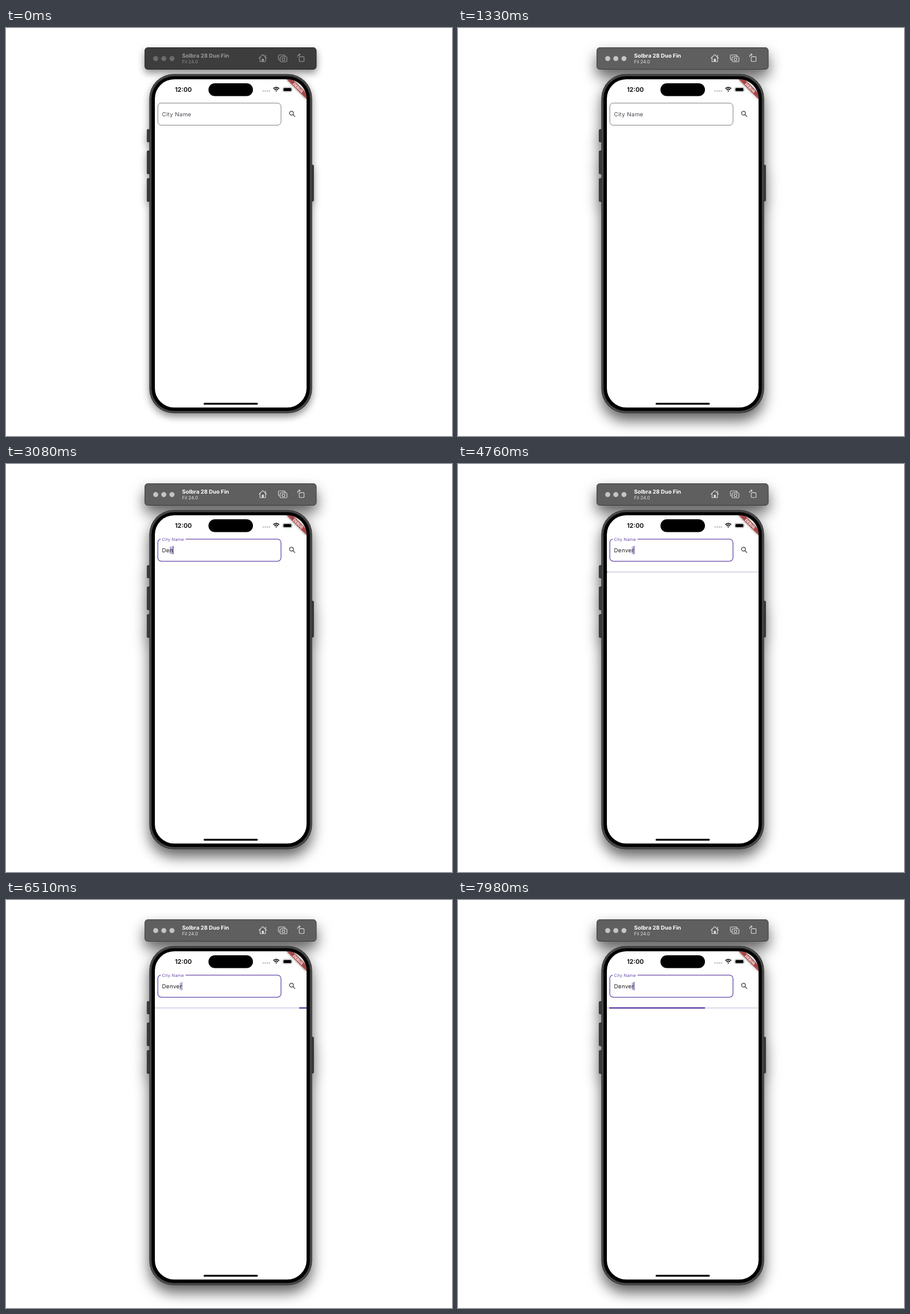
Write an HTML page that moves like this. It is 782 px wide and 716 px high and loops after 8 s.

```html
<!DOCTYPE html>
<html lang="en">
<head>
<meta charset="utf-8">
<title>City search</title>
<style>
  html, body { margin: 0; width: 100%; height: 100%; overflow: hidden; background: #fff; }
  svg {
    display: block; width: 782px; height: 716px;
    font-family: Inter, "Open Sans", sans-serif; text-rendering: geometricPrecision;
    --bar: #3d3d3d; --edge: #262626; --dots: #6b6b6b; --title: #999; --sub: #8c8c8c; --icon: #979797;
    --shadow: drop-shadow(0 6px 6.5px rgba(0, 0, 0, .45));
  }
  svg.active {
    --bar: #5f5f5f; --edge: #3a3a3a; --dots: #c4c4c4; --title: #fff; --sub: #e2e2e2; --icon: #dcdcdc;
    --shadow: drop-shadow(0 13px 12px rgba(0, 0, 0, .62));
  }
  #device { filter: var(--shadow); }
  #bar { fill: var(--bar); stroke: var(--edge); }
  #dots { fill: var(--dots); }
  #icons { fill: none; stroke: var(--icon); stroke-width: 1.1; stroke-linejoin: round; stroke-linecap: round; }
  #icons .solid { fill: var(--icon); stroke: none; }
  .button { fill: #3b3b3c; stroke: #222; stroke-width: .8; }
  .input { font-size: 9.9px; letter-spacing: .31px; }
</style>
</head>
<body>
<svg id="stage" viewBox="0 0 782 716">
  <defs>
    <clipPath id="screen"><rect x="261" y="90" width="266" height="576" rx="34"/></clipPath>
    <filter id="soft" x="-20%" y="-100%" width="140%" height="300%"><feGaussianBlur stdDeviation="2"/></filter>
  </defs>

  <g id="device">
    <rect id="bar" x="243.5" y="34.5" width="300.5" height="38" rx="5"/>
    <rect class="button" x="247.4" y="178" width="6" height="22" rx="1.5"/>
    <rect class="button" x="247.4" y="215.5" width="6" height="40.5" rx="1.5"/>
    <rect class="button" x="247.4" y="264" width="6" height="40.5" rx="1.5"/>
    <rect class="button" x="534" y="240.5" width="5.4" height="63.5" rx="1.5"/>
    <rect x="251.3" y="80.7" width="285.4" height="595.3" rx="43" fill="#2a2a2c"/>
    <rect x="252.3" y="81.7" width="283.4" height="593.3" rx="42" fill="#505052"/>
    <rect x="254.2" y="83.6" width="279.6" height="589.5" rx="40.2" fill="#2c2c2e"/>
    <rect x="255.6" y="85" width="276.8" height="586.7" rx="39" fill="#000"/>
  </g>

  <g id="dots">
    <circle cx="262.5" cy="53.6" r="4.4"/><circle cx="276.7" cy="53.6" r="4.4"/><circle cx="291" cy="53.6" r="4.4"/>
  </g>
  <text x="308.8" y="52.2" font-size="9.6" font-weight="700" fill="var(--title)">Solbra 28 Duo Fin</text>
  <text x="308.8" y="62.3" font-size="8" fill="var(--sub)">Fil 24.0</text>
  <g id="icons">
    <path d="M443.6 53 450.2 46.6 456.8 53M445.4 51.6V59H455V51.6M455 47.2V51"/>
    <rect class="solid" x="448.6" y="54" width="3.4" height="5"/>
    <path d="M480 56H479Q477.7 56 477.7 54.6V48.6Q477.7 47.3 479 47.3H488Q489.4 47.3 489.4 48.6V49.5"/>
    <path d="M482 50.8H484L484.8 49.8H488.4L489.2 50.8H491.2Q492.6 50.8 492.6 52V58Q492.6 59.2 491.2 59.2H482Q480.7 59.2 480.7 58V52Q480.7 50.8 482 50.8Z"/>
    <circle cx="486.6" cy="54.9" r="2.4"/>
    <rect x="514.2" y="50.4" width="8.4" height="8.4" rx="1"/>
    <path d="M511.3 50.4Q511 47 515.4 46.6M514 45 515.8 46.6 514.2 48.2"/>
  </g>

  <g clip-path="url(#screen)">
    <rect x="261" y="90" width="266" height="576" fill="#fff"/>
    <text x="296.2" y="112" font-size="11" font-weight="600">12:00</text>
    <rect x="355" y="97" width="78" height="22.6" rx="11.3"/>
    <g fill="#b8b8b8">
      <circle cx="451" cy="110.6" r="1.25"/><circle cx="454.6" cy="110.6" r="1.25"/>
      <circle cx="458.2" cy="110.6" r="1.25"/><circle cx="461.8" cy="110.6" r="1.25"/>
    </g>
    <g fill="none" stroke="#000" stroke-width="1.7">
      <path d="M468.8 106.4Q473.9 101.8 479 106.4M470.7 108.5Q473.9 105.6 477.1 108.5"/>
      <path d="M472.2 110.1Q473.9 108.7 475.6 110.1L473.9 111.8Z" fill="#000" stroke="none"/>
    </g>
    <rect x="485.2" y="104" width="16.4" height="8" rx="2.5" fill="none" stroke="#aaa" stroke-width=".8"/>
    <rect x="486.4" y="105.2" width="14" height="5.6" rx="1.5"/>
    <path d="M502.6 106.7Q503.8 108 502.6 109.4Z" fill="#aaa"/>

    <path id="border" fill="none"/>
    <text id="label" class="input">City Name</text>
    <rect id="highlight" y="145" height="13" fill="#674aa8" fill-opacity=".4"/>
    <text id="typed" class="input" x="273.4" y="155.1" fill="#1d1b20"></text>
    <rect id="cursor" y="143.6" width="1.25" height="14.8" fill="#674aa8"/>
    <g transform="translate(494.7 143.6) scale(.6186)" fill="none" stroke="#49454f" stroke-width="2.1">
      <circle cx="9.5" cy="9.5" r="5.5"/><path d="M13.6 13.6 19.8 19.8"/>
    </g>

    <g id="progress">
      <rect x="261" y="188.2" width="266" height="2.5" fill="#e1dded"/>
      <rect id="line1" y="188.2" height="2.5" fill="#674aa8"/>
      <rect id="line2" y="188.2" height="2.5" fill="#674aa8"/>
    </g>

    <g transform="translate(527 90) rotate(45)">
      <rect x="-25" y="17.3" width="50" height="7.4" fill-opacity=".5" filter="url(#soft)"/>
      <rect x="-25" y="17.3" width="50" height="7.4" fill="#b71c1c" fill-opacity=".63"/>
      <text y="23.3" font-size="6.3" font-weight="800" fill="#fff" text-anchor="middle">DEBUG</text>
    </g>
    <rect x="346.5" y="657.8" width="95" height="3.2" rx="1.6"/>
  </g>
</svg>

<script>
const LOOP = 8000, TICK = 70, SLOWDOWN = 1.05;
const ACTIVATE = 1330, FOCUS = 1510, LOAD = 4760;
const TRACK_X = 261, TRACK_W = 266, TEXT_X = 273.4;
const WORD = 'Denver', KEY_TIMES = [2800, 2940, 3080, 3150, 3290, 3430];
const CURSOR_RESTARTS = [1515, 2790, 3420];
const LOAD_CLOCK = [[4760, 14], [5880, 1081], [7210, 2364], [7980, 3081]];

const $ = id => document.getElementById(id);
const clamp = v => Math.min(1, Math.max(0, v));
const lerp = (a, b, p) => a + (b - a) * p;
const set = (id, attrs) => {
  for (const name in attrs) $(id).setAttribute(name, attrs[name]);
};

function cubic(x1, y1, x2, y2) {
  const at = (a, b, s) => 3 * (1 - s) ** 2 * s * a + 3 * (1 - s) * s * s * b + s ** 3;
  return x => {
    if (x <= 0 || x >= 1) return clamp(x);
    let lo = 0, hi = 1;
    for (let i = 0; i < 24; i++) {
      const mid = (lo + hi) / 2;
      if (at(x1, x2, mid) < x) lo = mid; else hi = mid;
    }
    return at(y1, y2, lo);
  };
}

const interval = (start, length, curve) => ms => curve((ms - start) / length);
const floatCurve = cubic(.4, 0, .2, 1);
const head1 = interval(0, 750, cubic(.2, 0, .8, 1));
const tail1 = interval(333, 750, cubic(.4, 0, 1, 1));
const head2 = interval(1000, 567, cubic(0, 0, .65, 1));
const tail2 = interval(1267, 533, cubic(.1, 0, .45, 1));

function drawField(p) {
  const tint = idle => `color-mix(in srgb, #674aa8 ${p * 100}%, ${idle})`;
  const gap = 43.5 * p;
  set('border', {
    d: `M${271.3 + gap} 131.8H476a6.2 6.2 0 0 1 6.2 6.2V164.4a6.2 6.2 0 0 1-6.2 6.2` +
       `H272.4a6.2 6.2 0 0 1-6.2-6.2V138Q266.2 132.6 271.3 131.8${p ? '' : 'Z'}`,
    'stroke-width': lerp(.9, 1.3, p)
  });
  $('border').style.stroke = tint('#6f6b74');
  $('label').style.fill = tint('#49454f');
  set('label', { transform: `translate(${TEXT_X} ${lerp(155.1, 135.1, p)}) scale(${lerp(1, .75, p)})` });
}

// Holds for half a second, then fades out and back in quarter steps.
function cursorOpacity(t) {
  const start = CURSOR_RESTARTS.filter(s => s <= t).pop();
  if (start === undefined) return 0;
  const phase = (t - start) / 1000 / SLOWDOWN % 1;
  const steps = from => Math.floor((phase - from) / .0375 + 1e-6) / 4;
  return phase < .75 ? clamp(1 - Math.max(0, steps(.5))) : clamp(steps(.85));
}

function drawTyping(t) {
  const count = KEY_TIMES.filter(k => k <= t).length;
  const typed = $('typed');
  typed.textContent = WORD.slice(0, count);
  const width = n => n > 0 ? typed.getSubStringLength(0, n) : 0;
  const end = width(count), start = width(count - 1);
  set('highlight', { x: TEXT_X + start, width: end - start });
  set('cursor', { x: TEXT_X + end - .5, opacity: cursorOpacity(t) });
}

function loadTime(t) {
  const next = Math.max(1, LOAD_CLOCK.findIndex(([at]) => at >= t));
  const [t0, v0] = LOAD_CLOCK[next - 1], [t1, v1] = LOAD_CLOCK[next];
  return lerp(v0, v1, (t - t0) / (t1 - t0));
}

function drawProgress(t) {
  $('progress').style.display = t < LOAD ? 'none' : '';
  if (t < LOAD) return;
  const ms = loadTime(t) % 1800;
  const line = (id, head, tail) => set(id, {
    x: TRACK_X + TRACK_W * tail(ms),
    width: TRACK_W * Math.max(0, head(ms) - tail(ms))
  });
  line('line1', head1, tail1);
  line('line2', head2, tail2);
}

const began = performance.now();

function draw() {
  const t = Math.floor(((performance.now() - began) % LOOP + .5) / TICK) * TICK;
  $('stage').classList.toggle('active', t >= ACTIVATE);
  drawField(floatCurve((t - FOCUS) / 170));
  drawTyping(t);
  drawProgress(t);
  requestAnimationFrame(draw);
}
draw();
</script>
</body>
</html>
```
